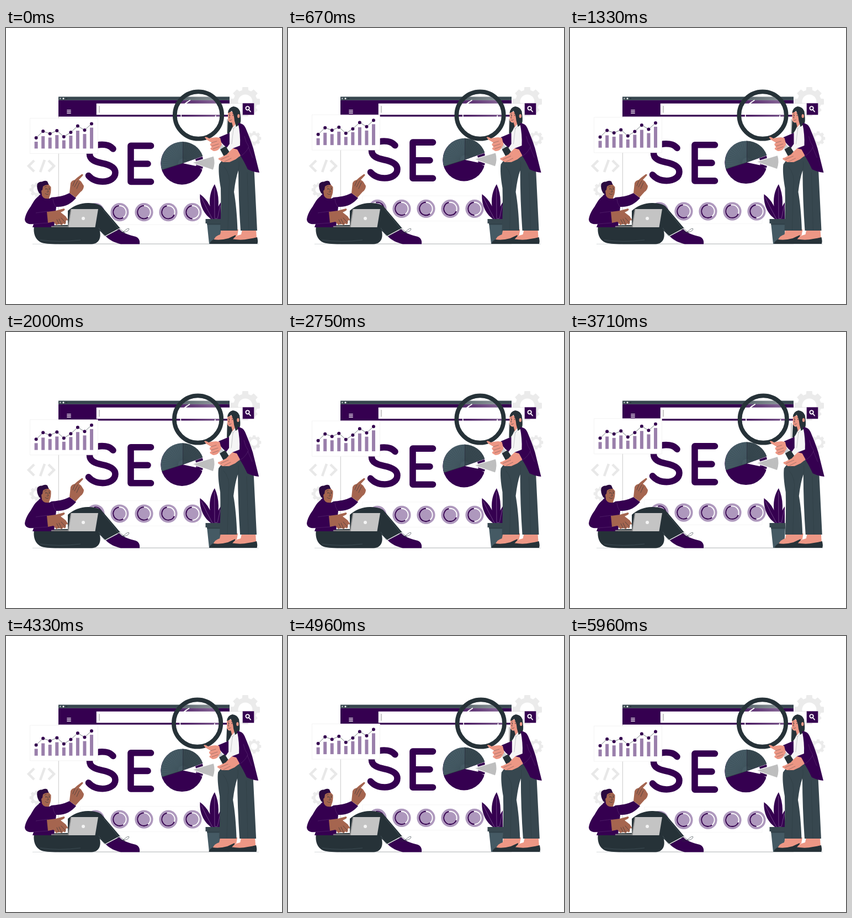
These frames come from a looping animation (500x500 px, 6000 ms). An HTML page:

```html
<!DOCTYPE html>
<html lang="en">
<head>
<meta charset="utf-8">
<title>SEO illustration</title>
<style>
  html, body { margin: 0; width: 100%; height: 100%; overflow: hidden; background: #fff; }
  svg { display: block; width: 100vw; height: 100vh; }
  .p { fill: #350050 } .d { fill: #263238 } .s { fill: #37474f }
  .m { fill: #a5654f } .w { fill: #ed9785 } .g { fill: #ebebeb }
  .l { fill: none; stroke: #263238; stroke-width: .6; stroke-linecap: round; stroke-linejoin: round }
  .seam { fill: none; stroke: #64387a; stroke-width: .5 }
  .seo { fill: none; stroke: #350050; stroke-width: 11.6; stroke-linecap: round; stroke-linejoin: round }
</style>
</head>
<body>
<svg viewBox="0 0 500 500">
  <g id="gears" class="g" fill-rule="evenodd"></g>
  <path d="M51 240L41 250L51 260M70 239L62 261M77 240L87 250L77 260" fill="none" stroke="#e8e8e8" stroke-width="4.5"/>

  <!-- browser window -->
  <path d="M95.4 160V391H405V160" fill="#fff" stroke="#b5b5b5" stroke-width=".7"/>
  <path d="M48 391.400H458" stroke="#9aa2a6" stroke-width=".4"/>
  <path class="p" d="M95 130.500H405V160.500H95Z"/>
  <path class="s" d="M95 124.500H405V130.800H95Z"/>
  <g fill="#fff"><circle cx="98.300" cy="127.700" r="1.300" opacity=".7"/><circle cx="104" cy="127.700" r="1.500"/></g>
  <circle class="d" cx="109.700" cy="127.700" r="1.300"/>
  <path d="M110.300 148.900H117.700M110.300 151.600H117.700M110.300 154.300H117.700" stroke="#fff" stroke-width="1.300"/>
  <path d="M163.800 136.700H429V157.300H163.800Z" fill="#fff"/>
  <path d="M405 136.600H429M405 157.300H429" stroke="#d0d0d0" stroke-width=".5"/>
  <path d="M169 141V153.500" stroke="#777" stroke-width=".8"/>
  <path class="p" d="M428.700 136.300H449.300V157.300H428.700Z"/>
  <g fill="none" stroke="#fff" stroke-width="1.900" stroke-linecap="round"><circle cx="437.600" cy="145.300" r="3.200"/><path d="M440 148L443 151.500"/></g>
  <path d="M400.900 165V192" stroke="#a9a9a9" stroke-width="1.300"/>

  <g id="floating">
    <path class="seo" d="M194 219C188 212.500 182 211.300 174 211.300C161 211.300 151.500 218 151.500 228C151.500 238 160 242 174 245C189 248 198 253 198 262C198 272 188 278.300 175 278.300C165 278.300 156 275 149.500 267.500M262.500 213.400H226V278.500H262.500M226 246H257"/>
    <circle class="p" cx="318.800" cy="245.200" r="38.500"/>
    <path fill="#fff" d="M320.500 245L357 232L359 238L344 239.500V248L358 253L357 257L344 250Z"/>
    <path class="p" d="M343 237.500L356 233L357 238L344 241ZM344 249L357 250L356 255L344 253Z"/>
    <path fill="#455a64" d="M320.500 245L282.500 257A39 39 0 0 1 320.500 206Z"/>
    <path class="s" d="M320.500 245V206A39 39 0 0 1 356.500 232Z"/>
    <path fill="#c4c4c4" stroke="#fff" stroke-width="1.300" d="M337 244L376.500 232Q380.500 245 375.500 257.500Z"/>
    <g id="hatch" class="l"></g>
    <path class="l" d="M320.500 206V245L282.500 257"/>
    <path d="M134.500 310.200H348V356H134.500Z" fill="none" stroke="#ededed" stroke-width=".5"/>
    <g id="donuts"></g>
    <path d="M43.500 163.400H166.500V227.500H43.500Z" fill="#fff" stroke="#e6e6e6" stroke-width=".5"/>
    <g id="chart"></g>
  </g>

  <!-- plant -->
  <path class="p" d="M376 347C366 323 367 300 378 283C387 302 387 327 380 347ZM373 347C360 339 350 322 351.500 301C366 312 374 327 376 347ZM381 347C381 334 383 324 389 316V347Z"/>
  <path d="M377.700 290L378 346M354 307Q363 326 374 346M388 322L383 346" fill="none" stroke="#a68bb6" stroke-width=".5"/>
  <path fill="#455a64" d="M364 353H390L388 391H368Z"/>
  <path class="s" d="M361.500 346H390V354H361.500Z"/>
  <path class="d" d="M363.800 354H390L389.800 356.500H364Z" opacity=".6"/>

  <!-- seated man -->
  <path class="d" d="M112 331C122 322 136 316.500 150 317C161 317.500 168 319 173 323L207 363L181 378L160 358H112Z"/>
  <path class="d" d="M51 358C49 370 52 384 65 389C74 392 93 391.500 118 391.500H155C168 391 174 381 169 364L161 356Z"/>
  <path d="M168 362L178 377M176 330Q190 345 203 363M62 384Q96 389 135 384" fill="none" stroke="#53656d" stroke-width=".5"/>
  <path class="p" d="M181 377.500L205 364.500C211 371 222 375 235 378C241 380 243 386 242 391.500H208C198 389 188 385 181 377.500Z"/>
  <path d="M180 377L206 363" stroke="#fff" stroke-width="1.300"/>
  <path class="l" d="M203 371Q211 373 214 368Q222 361 223 364Q222 369 213 370Q204 369 202 365Q207 363 214 370L217 375"/>
  <path class="p" d="M61 303.500C53 308 49 316 45 323C39 331 35 339 34 347C35 355 43 356 50 355L48 361H87L91 324C105 325 118 319 127 308L115 299C103 305 92 306 82 307L73 314Z"/>
  <path class="seam" d="M54 335Q60 334 76 332M90 324Q85 316 85 310M50 355L76 353"/>
  <path class="m" d="M115 299L117 281Q119 276 124 275.500L129 271L137 265Q140 264 139.500 267L132 275L136 278L141 286Q141 293 135 297L126 307Z"/>
  <path class="l" d="M125 276L121 286M130 277L124 288M133 280L128 291"/>
  <path class="m" d="M74 333L90 331L105 327Q108 328 105 331L99 334L108 341L112 347Q112 350 109 348L108 354Q107 357 104 354L101 357L96 355L91 357L86 351L76 353Z"/>
  <path class="l" d="M100 344L108 353M96 346L101 356M92 347L96 355"/>
  <path class="m" d="M64 290L63 303Q66 313 77 312L79 305Q82 299 81.500 288L77 283H66Z"/>
  <path d="M56.500 283Q59 278 65 278.500Q71 275.500 75 278L77.500 284Q71 283.500 67 287L66 293L64 295L65 303L60 299Q55 291 56.500 283Z" fill="#2b0a40"/>
  <path class="p" d="M59 304L64 300Q66 311 78 309L82 308Q80 315 72 315Q62 312 59 304Z"/>
  <path class="l" d="M70 288L73 287M77 288L79 289M75 291L77 297L74 297M71 300Q74 303 77 301"/>
  <g class="d"><circle cx="72.500" cy="291.500" r=".9"/><circle cx="78.500" cy="291.500" r=".9"/></g>
  <path fill="#8b8b8b" d="M82 358.800H115V360.800H82ZM117 328H119L114 361H111.500Z"/>
  <path fill="#c4c4c4" d="M118.500 328H167L161.500 361H113.500Z"/>
  <circle cx="140" cy="345" r="3" fill="#f4f4f4"/>

  <!-- standing woman with lens -->
  <g id="shaking">
    <path d="M380 203L397 224" stroke="#c9cdd0" stroke-width="8"/>
    <circle cx="348.500" cy="158" r="42" fill="url(#glass)"/>
    <path d="M329 133.500A31.300 31.300 0 1 0 379.800 158" fill="none" stroke="#fff" stroke-width="1.600"/>
    <path d="M324 137.500L334 130.500" stroke="#fff" stroke-width="1.600"/>
    <circle cx="348.500" cy="158" r="42.700" fill="none" stroke="#263238" stroke-width="7.700"/>

    <path class="w" d="M390 365H421L419 376L402 384H376Q380 376 388 374Z"/>
    <path class="d" d="M369.500 391Q369 387 376 383Q389 385 403 381L416 375V391Z"/>
    <path class="w" d="M428 365H453L454 380L440 384H410Q415 376 426 374Z"/>
    <path class="d" d="M403.500 391Q403 387 411 382.500Q427 385 440 382Q448 381 455 379Q457 386 455.500 391Z"/>
    <path class="s" d="M402 225L386 247Q384 262 389 290Q390 325 388 367H419.500Q418 325 413 297Q416 272 421 258Q421 310 425 367H455L449 245L430 222Z"/>
    <path class="l" d="M421 258Q423 250 422 242M395 251Q408 265 404 290L402 366M437 262L440 366" opacity=".5"/>
    <path fill="#f5f5f5" d="M406 177L420 173L425 194L424 233L402 231L400 215L403 191Z"/>
    <path class="w" d="M402 153Q408 149 416 154V174L411 180L407 177L408 171Q403 172 402 167Z"/>
    <path class="d" d="M402 154Q403 144 412 142Q421 143 424 151L425 160Q426 169 424 174L417 179L414 168Q413 156 409 150Q406 153 402 154ZM402 167Q405 173 409 171L411 178Q408 186 404 191H401Z"/>
    <ellipse class="w" cx="421.300" cy="159.500" rx="2.200" ry="3.600"/>
    <path class="l" d="M404 156L406 155M410 155L412 156M406 158L404 163L406 163M405 167Q408 168 409 166"/>
    <g class="d"><circle cx="405" cy="158" r=".8"/><circle cx="411" cy="158.500" r=".8"/></g>
    <path class="l" d="M409 177L412 183L418 176M412 183L409 210" opacity=".4"/>
    <path class="p" d="M405 190L386 198Q387 207 400 217L405 210Z"/>
    <path class="p" d="M420.500 172Q431 173 434 181Q443 202 448 218L459 262Q448 261 438 256Q430 239 425 232L412 236L411 218L424 213Q425 194 420.500 172Z"/>
    <path class="seam" d="M432 196Q434 207 440 215Q435 226 425 232M439 216L447 235"/>
    <path class="w" d="M360 198Q362 196 368 200L372 199L381 198L388 199L391 211L386 219Q383 223 376 223L371 220Q369 217 373 216L370 212Q369 209 373 208L363 202Z"/>
    <path class="l" d="M372 208L382 205M373 214L385 210M375 219L386 215" opacity=".6"/>
    <path class="d" d="M388 220L398 214L405 225L395 233Z"/>
    <path class="w" d="M411 218L419 220L425 231L416 238L405 243L393 243L385 238Q384 235 388 235L400 229Q404 224 411 218Z"/>
    <path class="l" d="M390 238L404 232M396 242L408 236" opacity=".6"/>
  </g>
  <defs>
    <linearGradient id="glass" x1=".1" y1=".6" x2=".6" y2="0"><stop stop-color="#fff" stop-opacity="0"/><stop offset="1" stop-color="#fff" stop-opacity=".38"/></linearGradient>
  </defs>
</svg>
<script>
const $ = id => document.getElementById(id);
const polar = (x, y, r, a) => `${x + r * Math.cos(a)} ${y + r * Math.sin(a)}`;

function gear(x, y, r, hole) {
  const points = [];
  for (let i = 0; i < 8; i++) {
    for (const [turn, size] of [[-.27, .8], [-.19, 1], [.19, 1], [.27, .8]])
      points.push(polar(x, y, r * size, i * Math.PI / 4 + turn));
  }
  return `<path d="M${points.join('L')}ZM${x - hole} ${y}a${hole} ${hole} 0 1 0 ${2 * hole} 0a${hole} ${hole} 0 1 0 ${-2 * hole} 0Z"/>`;
}
$('gears').innerHTML = gear(433.5, 133.5, 27, 13) + gear(449.5, 200, 13, 6) + gear(55.5, 293, 13, 6);

// Fine rays on the upper sectors, fine arcs on the loose slice
let rays = '', arcs = '';
for (let i = 0; i < 26; i++) {
  const a = 2.9 + i * .115;
  rays += `M${polar(320.5, 245, 9, a)}L${polar(320.5, 245, 37, a)}`;
}
for (let r = 8; r < 41; r += 2.2)
  arcs += `M${polar(337, 244, r, -.28)}A${r} ${r} 0 0 1 ${polar(337, 244, r, .32)}`;
$('hatch').innerHTML = `<path d="${rays}" opacity=".3"/><path d="${arcs}" opacity=".15"/>`;

const arcEnds = [[-1.8, .7], [1, 4.6], [.9, 4.7], [.4, 4.5], [1.6, 4.6]];
$('donuts').innerHTML = arcEnds.map(([from, to], i) => {
  const x = 162 + i * 44, y = 333.7;
  return `<circle cx="${x}" cy="${y}" r="16.6" fill="#ae98bd"/>
    <circle cx="${x}" cy="${y}" r="11.7" fill="#ae98bd" stroke="#fff" stroke-width="1.9"/>
    <path d="M${polar(x, y, 11.7, from)}A11.7 11.7 0 ${+(to - from > Math.PI)} 1 ${polar(x, y, 11.7, to)}" fill="none" stroke="#350050" stroke-width="2"/>`;
}).join('');

const tops = [206, 196, 198.5, 194, 203.5, 195, 186, 192, 180.5];
const dots = [199, 187, 191.5, 186, 197, 189, 177.5, 185, 173.5];
const chartX = i => 54.6 + i * 12.55;
$('chart').innerHTML =
  tops.map((y, i) => `<path d="M${chartX(i) - 3} ${y}h6V218.4h-6Z" fill="#9a7fab"/>`).join('') +
  `<path class="l" d="M${dots.map((y, i) => chartX(i) + ' ' + y).join('L')}"/>` +
  dots.map((y, i) => `<circle class="p" cx="${chartX(i)}" cy="${y}" r="3"/>`).join('');

const shakeStops = [0, -1, 2, -4, 4, -4, 4, -4, 2, -1, 0];
const start = performance.now();
function draw() {
  const t = (performance.now() - start) % 6000;
  const lift = 7 * (1 - Math.abs(2 * (t % 1500) / 1500 - 1));
  const k = Math.floor(t / 600), part = t / 600 - k;
  const shift = .7 * (shakeStops[k] + (shakeStops[k + 1] - shakeStops[k]) * part);
  $('floating').setAttribute('transform', `translate(0 ${-lift})`);
  $('shaking').setAttribute('transform', `translate(${shift} 0)`);
  requestAnimationFrame(draw);
}
draw();
</script>
</body>
</html>
```
